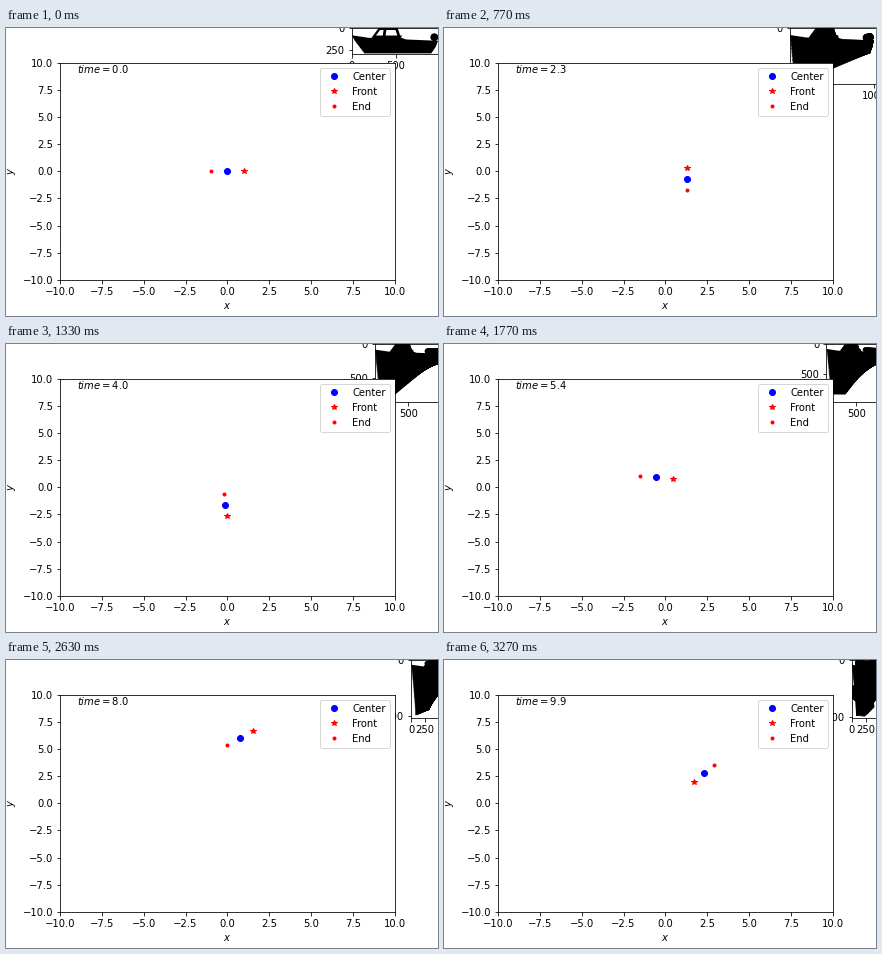
These frames come from a looping animation (432x288 px, 3310 ms). A matplotlib script:

```python
import numpy as np
import matplotlib.pyplot as plt
from matplotlib.animation import FuncAnimation
from matplotlib.collections import PathCollection
from matplotlib.path import Path
from matplotlib.transforms import Affine2D

TICK = 10            # ms
LOOP = 3310          # ms
STEPS = 99
IMG_W, IMG_H = 982, 295

# Key points of the voyage: time, place as x + iy, heading in degrees
TIMES = np.array([0, 2.32, 4.04, 5.35, 6.87, 7.98, 9.9])
PLACES = np.array([0, 1.29 - 0.74j, -0.14 - 1.65j, -0.54 + 0.9j,
                   -0.48 + 3.96j, 0.77 + 5.97j, 2.32 + 2.75j])
HEADINGS = np.array([0, 90, 275, 350, 365, 400, 594])


def glide(values, t):
    """Smooth curve through the key points, starting at rest."""
    slopes = np.gradient(values, TIMES)
    slopes[0] = 0
    k = min(np.searchsorted(TIMES, t, side="right"), len(TIMES) - 1) - 1
    span = TIMES[k + 1] - TIMES[k]
    s = (t - TIMES[k]) / span
    ease = s * s * (3 - 2 * s)
    bend = s * (1 - s) * ((1 - s) * slopes[k] - s * slopes[k + 1])
    return values[k] + (values[k + 1] - values[k]) * ease + span * bend


def polygon(*points):
    return Path(points + points[:1], closed=True)


def beam(x_top, x_low, y_top, y_low, width):
    """Slanted bar with level ends."""
    return polygon((x_top, y_top), (x_top + width, y_top),
                   (x_low + width, y_low), (x_low, y_low))


def make_boat():
    """Silhouette in image pixels, y pointing down."""
    hull = polygon((0, 82), (200, 112), (560, 110), (620, 130), (982, 145),
                   (955, 215), (905, 288), (145, 288), (40, 150))
    knob = Path.circle((940, 105), 45)
    roof = beam(310, 300, 0, 22, 215)
    sill = beam(250, 230, 85, 115, 325)
    posts = [beam(top, low, 5, 112, 32)
             for top, low in ((303, 225), (365, 350), (493, 528))]
    return [hull, knob, roof, sill, *posts]


def turned_size(deg):
    c, s = abs(np.cos(np.radians(deg))), abs(np.sin(np.radians(deg)))
    return IMG_W * c + IMG_H * s, IMG_H * c + IMG_W * s


def turned(parts, deg):
    """Parts turned counter-clockwise inside their enlarged image box."""
    w, h = turned_size(deg)
    move = (Affine2D().translate(-IMG_W / 2, -IMG_H / 2)
            .rotate_deg(-deg).translate(w / 2, h / 2))
    return [move.transform_path(p) for p in parts]


fig = plt.figure(figsize=(6, 4), dpi=72, facecolor="white")
fig.subplots_adjust(left=0.125, right=0.9, bottom=0.125, top=0.88)

ax = fig.add_subplot()
ax.set(xlim=(-10, 10), ylim=(-10, 10), xlabel="$x$", ylabel="$y$")
center, = ax.plot([], [], "bo", label="Center")
front, = ax.plot([], [], "r*", label="Front")
end, = ax.plot([], [], "r.", label="End")
ax.legend(loc="upper right")
clock = ax.text(0.05, 0.95, "", transform=ax.transAxes)

inset = fig.add_axes([0.8, 0.8, 0.2, 0.2], anchor="NE", zorder=-1)
inset.set_aspect("equal")
boats = PathCollection([], facecolors="black", edgecolors="none")
inset.add_collection(boats, autolim=False)

# Turned boats pile up in the inset, one more per step
boat = make_boat()
pile = [part for deg in range(STEPS) for part in turned(boat, deg)]


def draw(n):
    step = min(int(0.3 * n + 0.15), STEPS - 1)
    t = step * 10 / STEPS
    place = glide(PLACES, min(t, TIMES[-1]))
    ahead = np.exp(1j * np.radians(glide(HEADINGS, t)))
    for mark, z in ((center, place), (front, place + ahead), (end, place - ahead)):
        mark.set_data([z.real], [z.imag])
    clock.set_text(f"$time = {t:.1f}$")

    boats.set_paths(pile[:(step + 1) * len(boat)])
    w, h = turned_size(step)
    inset.set_xlim(-0.5, w - 0.5)
    inset.set_ylim(h - 0.5, -0.5)


anim = FuncAnimation(fig, draw, frames=LOOP // TICK, interval=TICK,
                     init_func=lambda: draw(0), repeat=True, repeat_delay=0)
plt.show()
```
